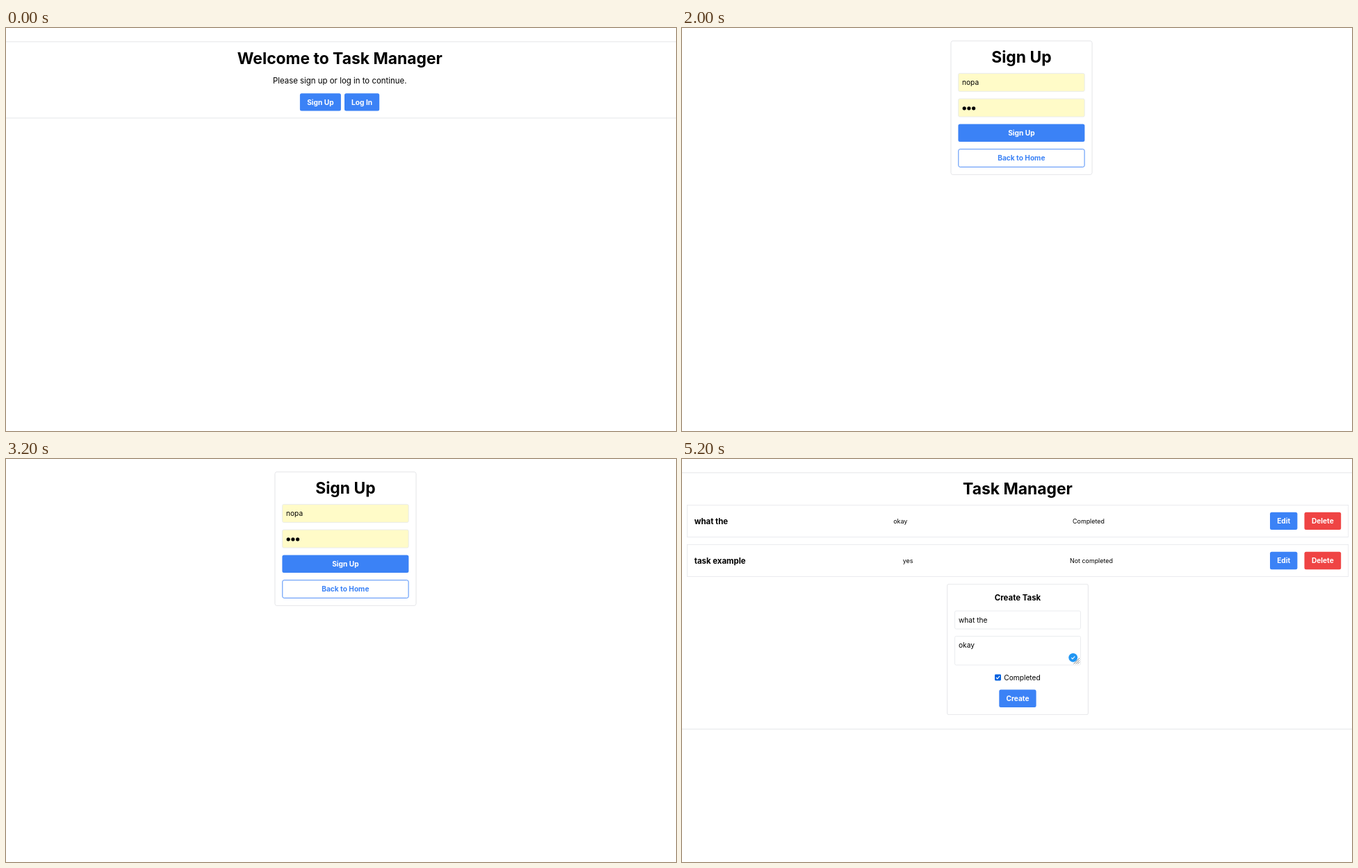
These frames come from a looping animation (964 by 581 pixels, 6000 ms). An HTML page:

```html
<!DOCTYPE html>
<html lang="en">
<head>
<meta charset="utf-8">
<title>Task Manager</title>
<style>
  html, body { margin: 0; width: 100%; height: 100%; overflow: hidden; background: #fff; }
  svg { display: block; width: 964px; height: 581px; font-family: Inter, sans-serif; font-optical-sizing: none; }
  .panel { fill: #fff; stroke: #e5e7eb; stroke-width: .7; filter: drop-shadow(0 .6px .7px rgba(0, 0, 0, .16)); }
  .field { stroke: #e5e7eb; stroke-width: .8; }
</style>
</head>
<body>
<svg id="stage" viewBox="0 0 964 581"></svg>
<script>
const BLUE = '#3b82f6', RED = '#ef4444', YELLOW = '#fffbc8';
const TITLE = 22.86, LARGE = 11.43, BASE = 10.16, SMALL = 8.89;

// Text is placed by the middle of its capitals.
const text = (x, cy, size, str, { weight = 400, anchor = 'middle', fill = '#000' } = {}) =>
  `<text x="${x}" y="${cy + size * .364}" font-size="${size}" font-weight="${weight}" text-anchor="${anchor}" fill="${fill}">${str}</text>`;
const bold = (x, cy, size, str, options) => text(x, cy, size, str, { weight: 700, ...options });
const left = { anchor: 'start' };

const rect = (x, y, w, h, attrs) => `<rect x="${x}" y="${y}" width="${w}" height="${h}" ${attrs}/>`;
const panel = (x, y, w, h, r = 2.5) => rect(x, y, w, h, `rx="${r}" class="panel"`);
const field = (x, y, w, h, fill = '#fff', r = 2) => rect(x, y, w, h, `rx="${r}" fill="${fill}" class="field"`);
const button = (x, y, w, label, fill = BLUE) =>
  rect(x, y, w, 25.4, `rx="2.5" fill="${fill}"`) + bold(x + w / 2, y + 12.9, BASE, label, { fill: '#fff' });
const line = (d, stroke, width) => `<path d="${d}" fill="none" stroke="${stroke}" stroke-width="${width}"/>`;

const task = (y, name, note, noteX, status, statusX) =>
  field(7.4, y, 951.3, 46, '#fff', 0) +
  bold(17.7, y + 23.6, LARGE, name, left) +
  text(noteX, y + 23.7, SMALL, note) +
  text(statusX, y + 23.7, SMALL, status) +
  button(846, y + 10.3, 39.4, 'Edit') +
  button(895.5, y + 10.3, 52.7, 'Delete', RED);

const home =
  panel(-5, 20, 974, 109.8, 0) +
  bold(480.3, 43.2, TITLE, 'Welcome to Task Manager') +
  text(480.2, 75.6, LARGE, 'Please sign up or log in to continue.') +
  button(422.9, 94.2, 59, 'Sign Up') +
  button(487, 94.2, 50.2, 'Log In');

const signUp =
  panel(387.1, 18.8, 202.8, 192.4) +
  bold(488.4, 42, TITLE, 'Sign Up') +
  field(397.6, 65.4, 181.6, 26, YELLOW) +
  text(403, 78.4, BASE, 'nopa', left) +
  field(397.6, 102, 181.6, 26, YELLOW) +
  [406.2, 412.9, 419.6].map(x => `<circle cx="${x}" cy="115.8" r="2.6"/>`).join('') +
  button(397.4, 138.6, 182, 'Sign Up') +
  rect(397.8, 174.7, 181.3, 25.7, `rx="2.3" fill="#fff" stroke="${BLUE}" stroke-width=".9"`) +
  bold(488.3, 187.7, BASE, 'Back to Home', { fill: BLUE });

const tasks =
  panel(-5, 20, 974, 369.2, 0) +
  bold(483, 43, TITLE, 'Task Manager') +
  task(66.4, 'what the', 'okay', 314.3, 'Completed', 585) +
  task(123.5, 'task example', 'yes', 325, 'Not completed', 589) +
  panel(381.7, 180.4, 202.6, 188.2) +
  bold(483, 200, LARGE, 'Create Task') +
  field(392.5, 219, 181, 26) +
  text(398, 232.2, BASE, 'what the', left) +
  field(392.5, 255.5, 181, 41.5) +
  text(398, 268.8, BASE, 'okay', left) +
  '<circle cx="562.7" cy="286.3" r="6.4" fill="#2196f3"/>' +
  line('M560.3 286.5l1.7 1.7l3.2-3.5', '#fff', 1.1) +
  line('M563.5 295.5l8.5-8.5M566.3 295.5l5.7-5.7M569.1 295.5l2.9-2.9', '#666', .8) +
  rect(450, 310.4, 9, 9, 'rx="1.3" fill="#0060df"') +
  line('M452 315l1.8 1.8l3.3-3.9', '#fff', 1.2) +
  text(463.3, 315.1, BASE, 'Completed', left) +
  button(456.3, 332.6, 53.3, 'Create');

const scenes = [home, signUp, tasks];
const stage = document.getElementById('stage');
let shown = -1;

function draw(now) {
  const index = Math.floor(now / 2000) % scenes.length;
  if (index !== shown) stage.innerHTML = scenes[shown = index];
  requestAnimationFrame(draw);
}
draw(performance.now());
</script>
</body>
</html>
```
